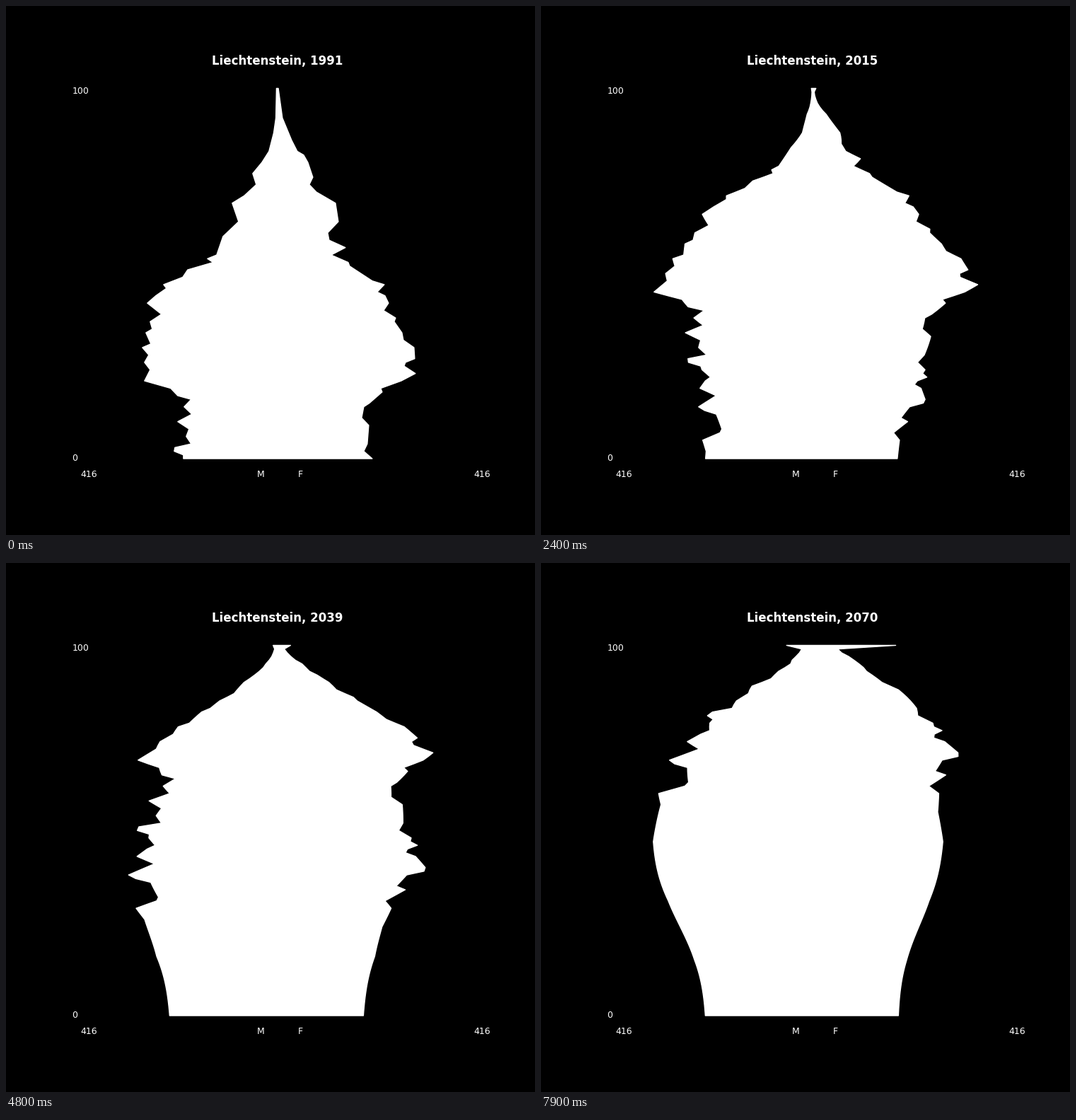
A matplotlib script for the animation above (8 s loop, 748 by 748 pixels).

```python
"""Population pyramid of Liechtenstein, 1991 to 2070, one year per frame.

Each year every cohort grows older by one: migration swells young adults,
Gompertz mortality thins out the old, and newborns enter at the bottom.
"""
import numpy as np
import matplotlib.pyplot as plt
from matplotlib.animation import FuncAnimation
from matplotlib.collections import PolyCollection

SIZE, DPI = 748, 100
LEFT, WIDTH = 0.125 * SIZE, 0.775 * SIZE   # plot area, px
BASE, HEIGHT = 0.89 * SIZE, 0.77 * SIZE
MID = LEFT + WIDTH / 2
FIRST, YEARS = 1991, 80
AGES = np.arange(101)
ROWS = BASE - HEIGHT * (0.05 + AGES / 100) / 1.1

# Turning points of the first profile: (age, width in px)
MEN = [
    (0, 133), (1, 133), (2, 146), (3, 145), (4, 122), (6, 129), (8, 125),
    (10, 141), (12, 121), (14, 132), (16, 122), (17, 141), (19, 151),
    (21, 188), (24, 180), (26, 188), (28, 182), (30, 191), (31, 179),
    (34, 186), (35, 177), (37, 180), (39, 164), (42, 184), (44, 172),
    (46, 157), (47, 161), (49, 134), (51, 127), (53, 91), (54, 99),
    (55, 86), (60, 77), (64, 55), (69, 64), (71, 47), (74, 30), (77, 35),
    (80, 22), (83, 12), (88, 5.3), (92, 2.3), (100, 1.4)]
WOMEN = [
    (0, 134), (2, 122), (4, 127), (9, 129), (11, 119), (14, 122), (15, 130),
    (18, 148), (19, 146), (21, 175), (23, 195), (25, 179), (26, 181),
    (27, 194), (30, 193), (32, 178), (34, 176), (37, 165), (38, 167),
    (40, 150), (42, 157), (44, 152), (45, 141), (47, 151), (48, 134),
    (52, 102), (53, 100), (55, 76), (57, 96), (59, 73), (61, 71), (64, 86),
    (69, 82), (72, 55), (74, 45), (76, 50), (80, 43), (82, 37), (83, 28),
    (86, 20), (92, 7), (100, 1.2)]

# Newborns: (year, width in px)
BOYS = [
    (1991, 133), (1993, 126), (1994, 134), (1996, 144), (1998, 126),
    (2001, 153), (2002, 146), (2003, 131), (2007, 126), (2008, 129),
    (2010, 154), (2013, 150), (2023, 156), (2039, 152.5), (2055, 154),
    (2070, 151.5)]
GIRLS = [
    (1992, 133), (1993, 140), (1994, 130), (1995, 128), (1996, 138),
    (1999, 148), (2000, 147), (2001, 130), (2004, 121), (2005, 131),
    (2008, 113), (2010, 122), (2015, 120), (2023, 125), (2039, 121.5),
    (2055, 122.5), (2070, 121.5)]


def curve(x, points):
    return np.interp(x, *np.transpose(points))


def bell(x, center, spread):
    return np.exp(-((x - center) / spread) ** 2 / 2)


def growth(year, inflow, death, slope, steepening):
    """Yearly factor at each age."""
    age, t = AGES + 0.5, year - 1999
    dip = 1 - 0.35 * bell(year, 2011, 3.5)
    migration = inflow * dip * bell(age, 23, 10.5)
    mortality = death * np.exp((slope + steepening * t) * (age - 74)
                               - 0.0167 * t)
    return np.exp(migration - mortality)


def project(start, births, **rates):
    """Widths by year and age; the last age collects everyone of 100 or more."""
    years = [curve(AGES, start)]
    for year in range(FIRST, FIRST + YEARS - 1):
        stay = years[-1] * growth(year + 0.5, **rates)
        new = np.append(curve(year + 1, births), stay[:-1])
        new[-1] += stay[-1]
        years.append(new)
    return years


men = project(MEN, BOYS, inflow=0.0145, death=0.043,
              slope=0.088, steepening=0.0005)
women = project(WOMEN, GIRLS, inflow=0.0152, death=0.0218,
                slope=0.116, steepening=0.00033)

plt.rcParams["font.family"] = "DejaVu Sans"
fig = plt.figure(figsize=(SIZE / DPI, SIZE / DPI), dpi=DPI, facecolor="black")
ax = fig.add_axes([0, 0, 1, 1])
ax.set(xlim=(0, SIZE), ylim=(SIZE, 0))
ax.axis("off")


def label(x, y, text, ha="left", size=9, **style):
    """Place text at a fraction of the plot area."""
    return ax.text(LEFT + x * WIDTH, BASE - y * HEIGHT, text, color="white",
                   ha=ha, va="baseline", fontsize=size, **style)


shape = PolyCollection([], facecolor="white", edgecolor="white", linewidth=1)
ax.add_collection(shape, autolim=False)
title = label(0.5, 1.012, "", ha="center", size=12, weight="bold")
label(0, 0.94, "100")
label(0, 0.04, "0")
for x, text in [(0.02, "416"), (0.45, "M"), (0.55, "F"), (0.98, "416")]:
    label(x, 0, text)


def draw(i):
    left = np.column_stack([MID - men[i], ROWS])
    right = np.column_stack([MID + women[i], ROWS])
    shape.set_verts([np.vstack([left, right[::-1]])])
    title.set_text(f"Liechtenstein, {FIRST + i}")
    return shape, title


anim = FuncAnimation(fig, draw, frames=YEARS, interval=100, repeat=True,
                     repeat_delay=0)
plt.show()
```
